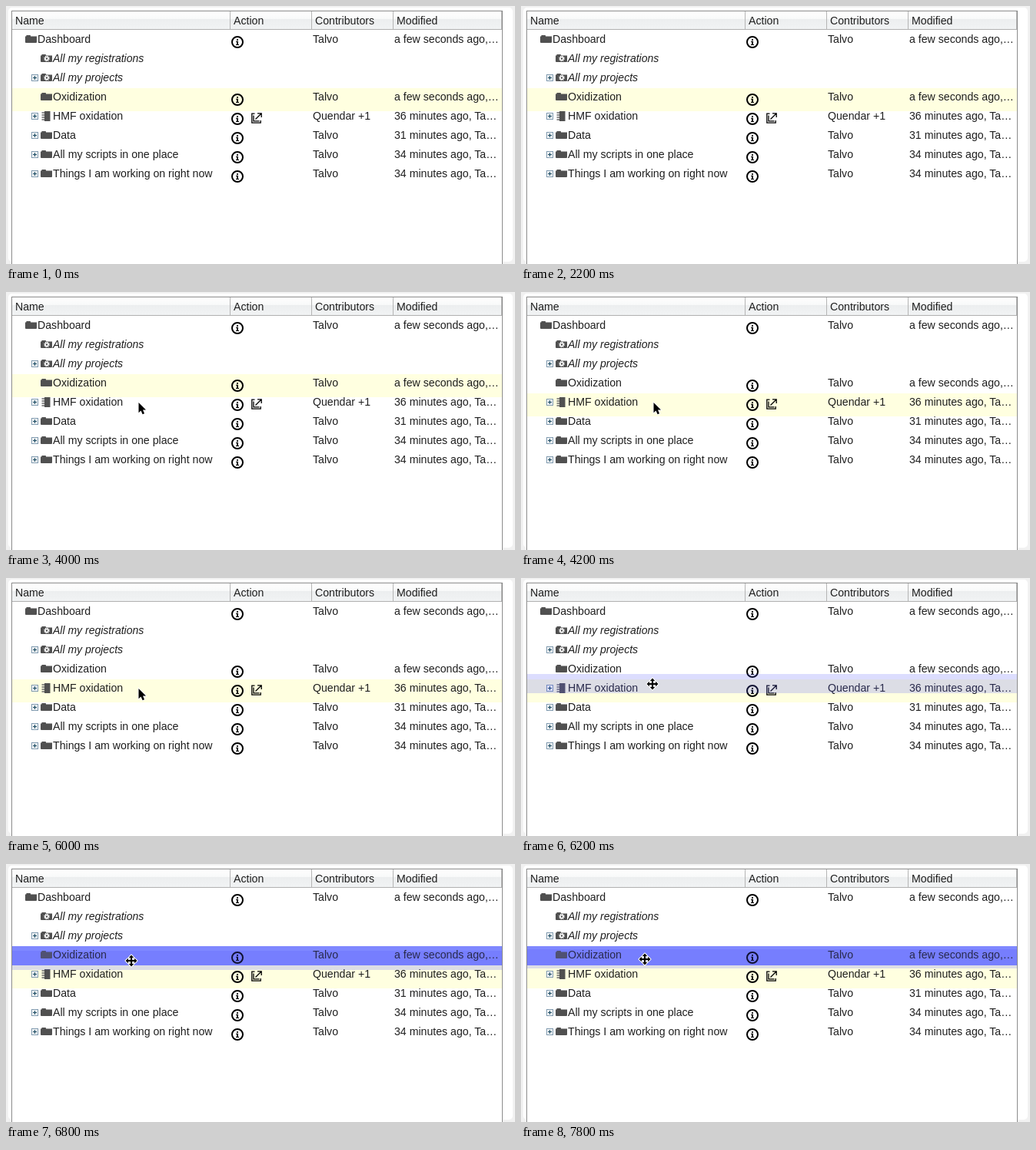
An HTML page that plays this animation: 662x336 px, repeating every 8 s.

```html
<!DOCTYPE html>
<html lang="en">
<head>
<meta charset="utf-8">
<title>File tree drag and drop</title>
<style>
  html, body { margin: 0; width: 100%; height: 100%; overflow: hidden; background: #f1f1f1; }
  svg { display: block; width: 100%; height: 100%; }
  text { font: 14.15px "Liberation Sans", Arial, sans-serif; fill: #1f1f1f; white-space: pre; }
  .it { font-size: 14px; font-style: italic; }
</style>
</head>
<body>
<svg viewBox="0 0 662 336">
  <defs>
    <linearGradient id="head" x1="0" y1="0" x2="0" y2="1">
      <stop offset="0" stop-color="#fff"/>
      <stop offset=".42" stop-color="#f8f9f9"/>
      <stop offset=".42" stop-color="#eceeef"/>
      <stop offset="1" stop-color="#f1f3f4"/>
    </linearGradient>
    <path id="folder" d="M0 2.5H1.3V1.8Q1.3 1 2.1 1H6.2Q7 1 7 1.8V2.5H15V10Q15 11 14 11H1Q0 11 0 10Z" fill="#505050"/>
    <g id="smart">
      <use href="#folder"/>
      <circle cx="8" cy="6.5" r="3.2" fill="none" stroke="#fff" stroke-width="1.2" stroke-dasharray="1.3 1.213"/>
      <circle cx="8" cy="6.5" r="2" fill="none" stroke="#fff" stroke-width="1.6"/>
    </g>
    <g id="book">
      <path d="M5 0H12.5V13H5Z" fill="#505050"/>
      <path d="M1.5 2H5M1.5 5H5M1.5 8H5M1.5 11H5" stroke="#6a6a6a" stroke-width="1.3"/>
    </g>
    <g id="plus">
      <rect x="-4" y="-4" width="8" height="8" fill="#fff" stroke="#7d98ad"/>
      <path d="M-2.5 0H2.5M0 -2.5V2.5" stroke="#184860" stroke-width="1.2"/>
    </g>
    <g id="info">
      <circle r="7" fill="none" stroke="#000" stroke-width="2"/>
      <path d="M-1 -4H1V-2.2H-1ZM-2 -1.2H1V3H2V4H-2V3H-1V-.2H-2Z"/>
    </g>
    <path id="open" d="M4.5 1.2H.8V13.2H12.2V10M3 3.5V10.8H10.5M5.5 8.5L12.8 1.2M8 .8H13.2V6" fill="none" stroke="#000" stroke-width="1.3"/>
  </defs>

  <rect x="3" y="2" width="656" height="331" rx="5" fill="#fff"/>
  <rect x="7.5" y="6.5" width="638" height="340" fill="#fff" stroke="#8c8c8c"/>
  <rect x="8" y="7" width="637" height="23" fill="url(#head)"/>
  <path d="M8 30.5H645" stroke="#b0b0b0"/>
  <path d="M291.5 7V30M397.5 7V30M503.5 7V30M644.5 7V30" stroke="#b5b5b5"/>

  <rect id="drop" x="8" y="107" width="637" height="25" fill="#7f88ff"/>
  <rect id="hover" x="8" width="637" height="30" fill="#ffffe0"/>
  <g id="rows"></g>
  <rect id="ghost" x="8" width="637" height="25" fill="#5055fa" fill-opacity=".2"/>

  <path id="arrow" d="M-.5 0V13.2L2.5 10.4L4.6 15.2L7 14.2L5 9.6H9Z" stroke="#fff" stroke-width="1.6" paint-order="stroke"/>
  <path id="move" d="M0 -7.5L3.2 -4H1.1V-1.1H4V-3.2L7.5 0L4 3.2V1.1H1.1V4H3.2L0 7.5L-3.2 4H-1.1V1.1H-4V3.2L-7.5 0L-4 -3.2V-1.1H-1.1V-4H-3.2Z"
        stroke="#fff" stroke-width="2" paint-order="stroke" stroke-linejoin="round"/>
</svg>
<script>
const $ = id => document.getElementById(id);
const LOOP = 8000, STEP = 200, PITCH = 25;

const label = (x, y, s, cls = '') => `<text x="${x}" y="${y}" class="${cls}">${s}</text>`;
const icon = (id, x, y) => `<use href="#${id}" x="${x}" y="${y}"/>`;

const recent = 'a few seconds ago,…';
const minutes = n => `${n} minutes ago, Ta…`;

// icon, name, contributors, modified, expandable
const items = [
  ['folder', 'Dashboard', 'Talvo', recent],
  ['smart', 'All my registrations'],
  ['smart', 'All my projects', '', '', true],
  ['folder', 'Oxidization', 'Talvo', recent],
  ['book', 'HMF oxidation', 'Quendar +1', minutes(36), true],
  ['folder', 'Data', 'Talvo', minutes(31), true],
  ['folder', 'All my scripts in one place', 'Talvo', minutes(34), true],
  ['folder', 'Things I am working on right now', 'Talvo', minutes(34), true]
];

function row([kind, name, who, when, expandable], i) {
  const base = 48 + PITCH * i, x = i ? 61 : 41;
  let out = icon(kind, x - 16, base - 11) + label(x, base, name, kind === 'smart' ? 'it' : '');
  if (expandable) out += icon('plus', 37.5, base - 4.5);
  if (who) out += icon('info', 301, base - 1) + label(399, base, who) + label(505, base, when);
  if (kind === 'book') out += icon('open', 319, base - 9);
  return out;
}

$('rows').innerHTML =
  [[12, 'Name'], [296, 'Action'], [402, 'Contributors'], [508, 'Modified']]
    .map(([x, s]) => label(x, 24, s)).join('') + items.map(row).join('');

// time, x, y of the pointer
const path = [
  [2400, 192, 245], [3000, 176, 152], [3400, 173, 144], [6000, 173, 144],
  [6200, 171, 138], [6400, 168, 130], [7000, 161, 124], [8000, 161, 124]
];

function pointer(t) {
  const k = Math.max(1, path.findIndex(p => p[0] >= t));
  const [t0, x0, y0] = path[k - 1], [t1, x1, y1] = path[k];
  const f = Math.max(0, (t - t0) / (t1 - t0));
  return [x0 + (x1 - x0) * f, y0 + (y1 - y0) * f].map(Math.round);
}

const show = (id, on) => $(id).setAttribute('visibility', on ? 'visible' : 'hidden');

function draw(ms) {
  const t = Math.floor(ms % LOOP / STEP) * STEP;
  const [x, y] = pointer(t), dragging = t >= 6200;
  show('arrow', t >= 2400 && !dragging);
  show('move', dragging);
  show('ghost', dragging);
  show('drop', t >= 6400);
  for (const id of ['arrow', 'move']) $(id).setAttribute('transform', `translate(${x} ${y})`);
  $('ghost').setAttribute('y', y - 13);
  $('hover').setAttribute('y', t < 4200 ? 107 : 132);
}

const start = performance.now();
function tick() {
  draw(performance.now() - start);
  requestAnimationFrame(tick);
}
tick();
</script>
</body>
</html>
```
